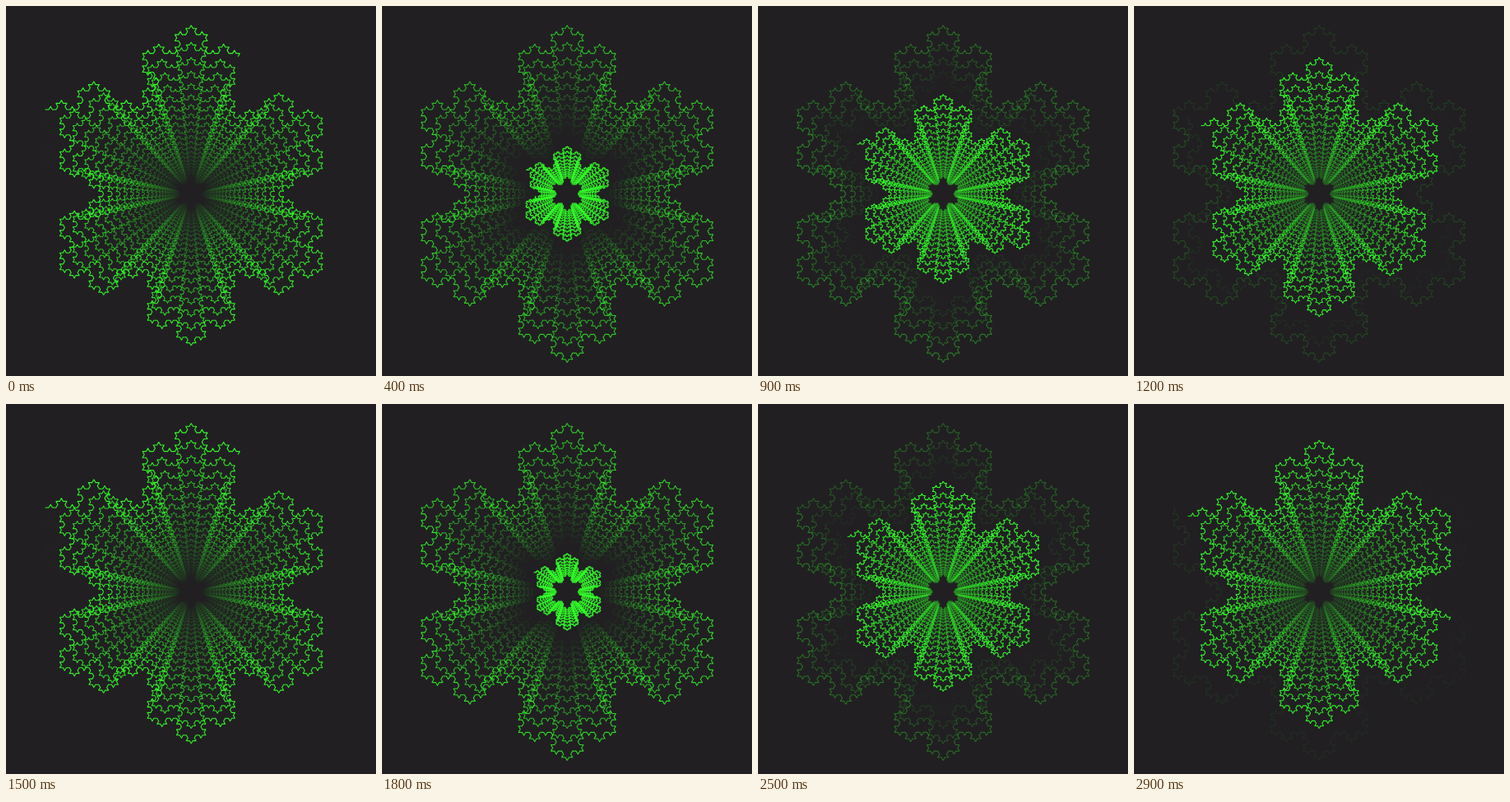
An HTML page with a canvas for the animation above (3000 ms loop, 450 by 450 pixels).

```html
<!DOCTYPE html>
<html lang="en">
<head>
<meta charset="utf-8">
<title>Koch snowflake tunnel</title>
<style>
html, body { margin: 0; width: 100%; height: 100%; overflow: hidden; background: #211f22; }
canvas { display: block; width: 450px; height: 450px; }
</style>
</head>
<body>
<canvas id="stage" width="450" height="450"></canvas>
<script>
const ctx = document.getElementById('stage').getContext('2d');
const SIZE = 450, CX = 225.2, CY = 228.5;
const COILS = 22, OUTER = 205, RATIO = 0.9;
const LEVEL = 4, CHUNK = 32;
const PERIOD = 1500, STEP = 100;

// Unit snowflake, clockwise from its upper left corner
const flake = [];
function koch(x0, y0, x1, y1, level) {
  if (!level) { flake.push([x1, y1]); return; }
  const dx = (x1 - x0) / 3, dy = (y1 - y0) / 3, h = Math.sqrt(3) / 2;
  const ax = x0 + dx, ay = y0 + dy, bx = x1 - dx, by = y1 - dy;
  const px = ax + dx / 2 + dy * h, py = ay + dy / 2 - dx * h;
  koch(x0, y0, ax, ay, level - 1);
  koch(ax, ay, px, py, level - 1);
  koch(px, py, bx, by, level - 1);
  koch(bx, by, x1, y1, level - 1);
}
const C30 = Math.cos(Math.PI / 6);
flake.push([-C30, -0.5]);
koch(-C30, -0.5, C30, -0.5, LEVEL);
koch(C30, -0.5, 0, 1, LEVEL);
koch(0, 1, -C30, -0.5, LEVEL);
const SEGS = flake.length - 1;

// Coils from the inside out; lengths are measured in radii
const coils = [];
let total = 0;
for (let i = 0; i < COILS; i++) {
  const r = OUTER * RATIO ** (COILS - 1 - i);
  coils.push({ r, start: total });
  total += r;
}
const FADE = total * 0.93;

// Pen position as coil number plus fraction of that coil
function along(c) {
  const { r, start } = coils[Math.floor(c)];
  return start + (c % 1) * r;
}
const keys = [
  [0, along(21.21) - total], [300, along(7.75)], [700, along(14.41)],
  [1000, along(17.42)], [1200, along(19.39)], [1400, along(20.46)],
  [PERIOD, along(21.21)]
];
function penAt(t) {
  const i = keys.findIndex(k => k[0] > t);
  const [t0, s0] = keys[i - 1], [t1, s1] = keys[i];
  return (s0 + (s1 - s0) * (t - t0) / (t1 - t0) + total) % total;
}

function strokePart(r, from, to, alpha) {
  if (alpha <= 0.01 || to <= from) return;
  ctx.globalAlpha = alpha;
  ctx.beginPath();
  for (let i = from; i <= to; i++) {
    ctx.lineTo(CX + flake[i][0] * r, CY + flake[i][1] * r);
  }
  ctx.stroke();
}

function draw(t) {
  const pen = penAt(t);
  ctx.globalAlpha = 1;
  ctx.fillStyle = '#211f22';
  ctx.fillRect(0, 0, SIZE, SIZE);
  ctx.strokeStyle = '#32ff28';
  ctx.lineWidth = 1.1;
  ctx.lineJoin = 'round';
  for (const { r, start } of coils) {
    const head = Math.round((pen - start) / r * SEGS);
    for (let a = 0; a < SEGS; a += CHUNK) {
      const b = a + CHUNK;
      const behind = pen - start - (a + b) / 2 / SEGS * r;
      const cut = Math.max(a, Math.min(b, head));
      strokePart(r, a, cut, Math.min(1, 1 - behind / FADE));
      strokePart(r, cut, b, 1 - (behind + total) / FADE);
    }
  }
}

let last = -1;
function tick() {
  const t = Math.floor(performance.now() % PERIOD / STEP) * STEP;
  if (t !== last) draw(last = t);
  requestAnimationFrame(tick);
}
tick();
</script>
</body>
</html>
```
